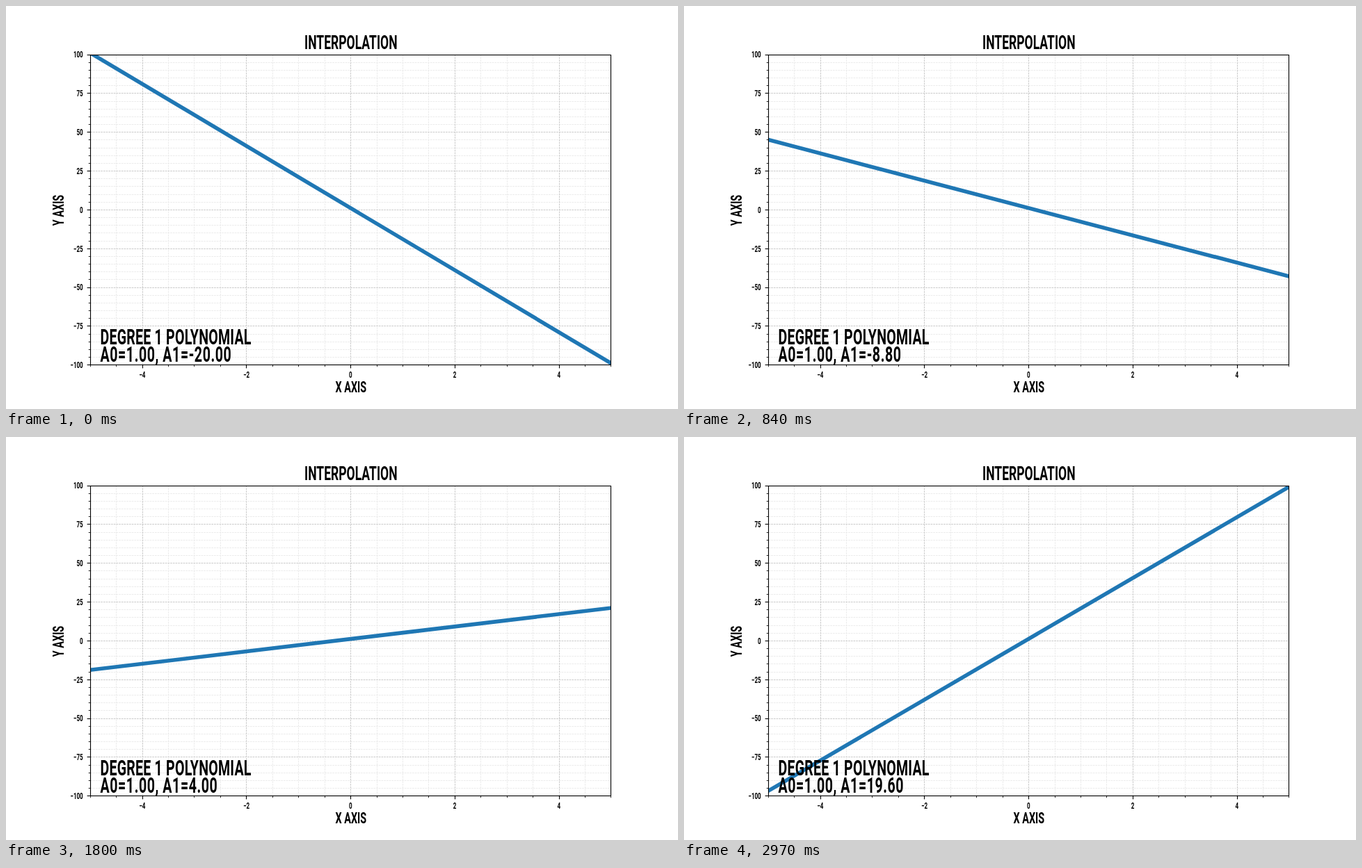
Recreate the animation shown at these times as an HTML page. Size 966 by 580 pixels, loop 3 s.

```html
<!DOCTYPE html>
<html lang="en">
<head>
<meta charset="utf-8">
<title>Interpolation</title>
<style>
  html, body { margin: 0; width: 100%; height: 100%; overflow: hidden; background: #fff; }
  svg { display: block; }
  text { font-family: Roboto, "Liberation Sans", sans-serif; font-weight: 700; fill: #000; }
  .minor { stroke: #ebebeb; stroke-dasharray: 2.6 1.1; }
  .major { stroke: #c9c9c9; stroke-dasharray: 2.6 1.1; }
  .tick, .frame { stroke: #000; stroke-width: 1.11; fill: none; }
  .small { stroke: #000; stroke-width: .83; }
  .curve { stroke: #1f77b4; stroke-width: 5.56; }
  .caption { letter-spacing: .35px; }
  .digits { letter-spacing: .9px; }
</style>
</head>
<body>
<svg id="stage" width="966" height="580" viewBox="0 0 966 580">
  <clipPath id="area"><rect x="121" y="70" width="749" height="447"/></clipPath>
</svg>
<script>
const stage = document.getElementById('stage');
const LEFT = 120.75, RIGHT = 869.4, TOP = 69.6, BOTTOM = 516.2;
const CONDENSE = 0.64; // one narrow face for every label
const STEP = 30, STEPS = 100;

const px = x => LEFT + (x + 5) / 10 * (RIGHT - LEFT);
const py = y => BOTTOM - (y + 100) / 200 * (BOTTOM - TOP);
const snap = v => Math.round(v) + 0.5;

function add(tag, attrs) {
  const el = document.createElementNS('http://www.w3.org/2000/svg', tag);
  for (const key in attrs) el.setAttribute(key, attrs[key]);
  return stage.appendChild(el);
}

const line = (x1, y1, x2, y2, cls) => add('line', { x1, y1, x2, y2, class: cls });

function label(str, x, y, size, anchor = 'middle', turn = 0) {
  const el = add('text', {
    'font-size': size,
    'text-anchor': anchor,
    transform: `translate(${x} ${y}) rotate(${turn}) scale(${CONDENSE} 1)`
  });
  el.textContent = str;
  return el;
}

function range(from, to, step) {
  const out = [];
  for (let v = from; v <= to; v += step) out.push(v);
  return out;
}

const minorX = range(-5, 5, 0.5), majorX = range(-4, 4, 2);
const minorY = range(-100, 100, 5), majorY = range(-100, 100, 25);
const name = v => String(v).replace('-', '\u2212');

function grid(xs, ys, cls) {
  xs.forEach(x => line(snap(px(x)), 516.5, snap(px(x)), 70.5, cls));
  ys.forEach(y => line(121.5, snap(py(y)), 869.5, snap(py(y)), cls));
}

function ticks(xs, ys, length, cls) {
  xs.forEach(x => line(snap(px(x)), 516.5, snap(px(x)), 516.5 + length, cls));
  ys.forEach(y => line(121.5, snap(py(y)), 121.5 - length, snap(py(y)), cls));
}

grid(minorX.filter(x => x % 2), minorY.filter(y => y % 25), 'minor');
grid(majorX, majorY, 'major');
const curve = line(0, 0, 0, 0, 'curve');
curve.setAttribute('clip-path', 'url(#area)');
ticks(minorX, minorY, 2.8, 'small');
ticks(majorX, majorY, 4.9, 'tick');
add('rect', { x: 121.5, y: 70.5, width: 748, height: 446, class: 'frame' });

majorX.forEach(x => label(name(x), px(x) + 0.3, 535, 12.5));
majorY.forEach(y => label(name(y), 110.7, py(y) + 4.8, 12.5, 'end'));
label('INTERPOLATION', 495.8, 62, 27.4);
label('X AXIS', 495.8, 555.7, 22.5);
label('Y AXIS', 83.3, 294, 22.5, 'middle', -90);
const caption = label('DEGREE 1 POLYNOMIAL', 135.5, 487, 30.6, 'start');
caption.setAttribute('class', 'caption');
const formula = label('', 135.5, 511.5, 30.6, 'start');
formula.setAttribute('class', 'digits');

// y = 1 + slope * x, drawn a little beyond the plot so the clip cuts it
function draw(step) {
  const slope = (step * 4 - 200) / 10;
  const end = 5.2;
  curve.setAttribute('x1', px(-end));
  curve.setAttribute('y1', py(1 - slope * end));
  curve.setAttribute('x2', px(end));
  curve.setAttribute('y2', py(1 + slope * end));
  formula.textContent = `A0=1.00, A1=${slope.toFixed(2)}`;
}

const start = performance.now();
function tick() {
  const time = Math.max(0, performance.now() - start);
  draw(Math.floor(time / STEP) % STEPS);
  requestAnimationFrame(tick);
}
draw(0);
requestAnimationFrame(tick);
</script>
</body>
</html>
```
